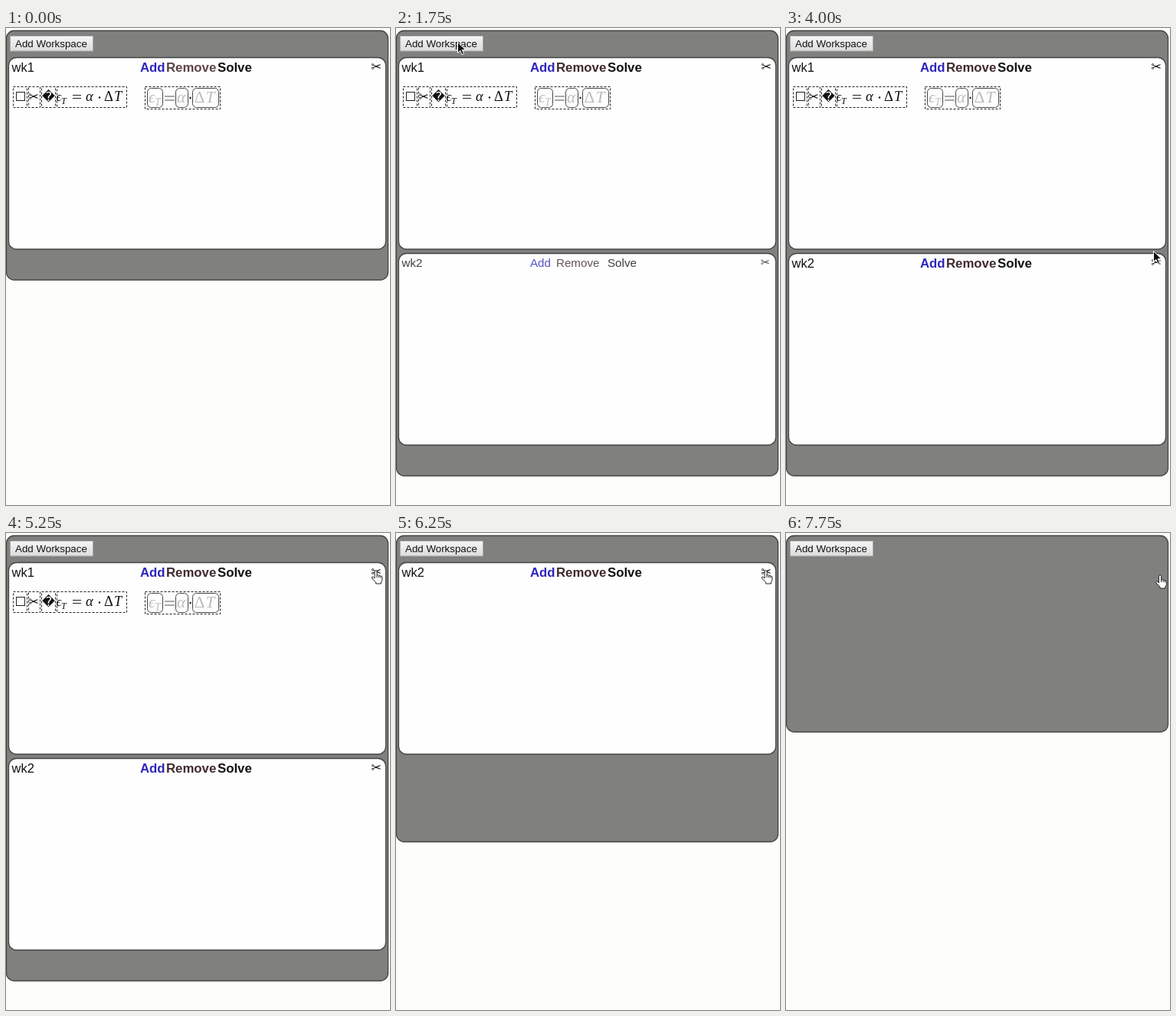
Recreate the animation shown at these times as an HTML page. Size 501 by 621 pixels, loop 8000 ms.

```html
<!DOCTYPE html>
<html lang="en">
<head>
<meta charset="utf-8">
<title>Workspaces</title>
<style>
  html, body { margin: 0; width: 100%; height: 100%; overflow: hidden; background: #fdfdfc; }
  svg { display: block; font-family: "Liberation Sans", sans-serif; }
  .sign { font-family: "DejaVu Sans", sans-serif; }
  .math { font-family: "Liberation Serif", "DejaVu Serif", serif; }
  .italic { font-style: italic; }
  .bold { font-weight: bold; }
  .dash { fill: none; stroke: #222; stroke-dasharray: 3 2; }
  .slot { fill: none; stroke: #444; }
</style>
</head>
<body>
<svg id="stage" width="501" height="621" viewBox="0 0 501 621"></svg>
<script>
const LOOP = 8000, STEP = 250, PITCH = 255;

// [time, value] pairs, each value held until the next time
const panelHeights = [[0, 325], [1500, 501], [1750, 580], [6250, 399], [6750, 325], [7750, 256]];

// [time, x, y] of the pointer's top left corner
const pointerPath = [
  [250, 476, 115], [500, 390, 88], [750, 250, 52], [1000, 125, 26], [1250, 80, 18],
  [2250, 80, 18], [2750, 340, 210], [3000, 428, 268], [3750, 480, 330],
  [4250, 478, 250], [5000, 475, 66], [5250, 476.5, 48],
  [6500, 476.5, 48], [7000, 482, 54], [LOOP, 482, 54]
];

const held = (keys, t) => keys.filter(k => k[0] <= t).pop()[1];

function along(path, t) {
  const i = path.findIndex(k => k[0] > t);
  const [t0, x0, y0] = path[i - 1], [t1, x1, y1] = path[i];
  const p = (t - t0) / (t1 - t0);
  return [x0 + (x1 - x0) * p, y0 + (y1 - y0) * p];
}

const text = (x, y, size, str, cls = "", fill = "#111") =>
  `<text x="${x}" y="${y}" font-size="${size}" class="${cls}" fill="${fill}">${str}</text>`;

const box = (x, y, w, h, cls, r = 0) =>
  `<rect x="${x + .5}" y="${y + .5}" width="${w}" height="${h}" rx="${r}" class="${cls}"/>`;

const equals = (x, y, w, gap, color) =>
  `<path d="M${x} ${y}h${w}m0 ${gap}h${-w}" stroke="${color}"/>`;

const dot = (x, y) => `<circle cx="${x}" cy="${y}" r="1.2" fill="#111"/>`;

function equation() {
  const grey = "#bcbcbc";
  return box(9, 76, 18, 27, "dash") + box(29, 76, 15, 27, "dash") +
    box(46, 76, 18, 27, "dash") + box(66, 76, 91, 27, "dash") +
    `<rect x="13.5" y="83.5" width="11" height="11" fill="none" stroke="#222"/>` +
    text(29.5, 95, 16, "✂", "sign") + text(47, 95, 16.5, "\uFFFD", "sign") +
    text(65.5, 95, 17, "ϵ", "math italic") + text(72, 98.5, 12, "T", "math italic") +
    equals(87, 87.5, 11, 4, "#222") + text(104, 95, 18.5, "α", "math italic") +
    dot(122, 90.5) + text(128, 95, 18.5, "Δ", "math") + text(141, 95, 18.5, "T", "math italic") +
    box(181, 76, 98, 29, "dash") + box(184, 78, 20, 25, "slot", 5) +
    box(221, 78, 16, 25, "slot", 5) + box(243, 78, 34, 25, "slot", 5) +
    text(186, 97, 21, "ϵ", "math italic", grey) + text(194, 101, 14, "T", "math italic", grey) +
    equals(207, 89, 13, 5, "#555") + text(223, 97, 21, "α", "math italic", grey) +
    dot(240.5, 91) + text(245.5, 97, 21.5, "Δ", "math", grey) +
    text(260.5, 97, 21.5, "T", "math italic", grey);
}

function workspace(name, top, t, grown = 1) {
  const done = grown === 1;
  const size = done ? 16.8 : 13 + 2.7 * grown, weight = done ? "bold" : "";
  const base = 55 + (done ? 2 : grown);
  const label = (x, str, color) => text(x, base, size, str, weight, color);
  return `<g transform="translate(0 ${top})">
    <rect x="3.5" y="38.5" width="492" height="249.5" rx="10" fill="#fefefe" stroke="#444" stroke-width="1.3"/>
    <g opacity="${grown}">${text(7.5, base, done ? 16.5 : size, name)}
    ${label(175, "Add", "#2e27bc")}
    ${label(209, "Remove", t < 1500 ? "#5c4444" : "#402a2e")}
    ${label(276, "Solve", "#111")}
    ${text(476, base - 1, done ? 16.5 : 14.5, "✂", "sign " + weight)}</g></g>`;
}

function button() {
  return `<rect x="5.5" y="10.5" width="108" height="19.5" fill="url(#face)" stroke="#aaa"/>` +
    text(12, 25, 13.33, "Add Workspace");
}

function pointer(t) {
  if (t < 250) return "";
  const [x, y] = along(pointerPath, t);
  const shape = t < 5250
    ? `<path d="M.5 .5V14.5L3.8 11.4L6.1 16.6L8.6 15.5L6.3 10.5H10.8Z" fill="#111" stroke="#fff"/>`
    : `<path d="M4.5 11V2.2Q4.5 .7 6 .7T7.5 2.2V7Q9 5.8 10 7.4Q11.5 6.5 12.3 8.2Q14 7.5 14.3 9.5V12.5
        Q14.3 14.5 12.8 16V18H6V16.3L1 11Q.2 9.4 1.6 9Q2.7 8.8 4.5 11ZM7.5 7V10M10 7.4V10M12.3 8.2V10.5"
        fill="#fff" stroke="#222"/>`;
  return `<g transform="translate(${x} ${y})">${shape}</g>`;
}

function scene(t) {
  const height = held(panelHeights, t);
  const panel = `x=".5" y="3.5" width="498" height="${height - .5}" rx="10"`;
  const grown = t < 1750 ? .4 : t < 2000 ? .8 : 1;
  let spaces = "";
  if (t < 6000) spaces += workspace("wk1", 0, t) + equation();
  if (t >= 1500 && t < 7750) spaces += workspace("wk2", t < 6000 ? PITCH : 0, t, grown);
  return `<defs>
    <linearGradient id="face" x2="0" y2="1"><stop stop-color="#f6f6f6"/><stop offset="1" stop-color="#dcdcdc"/></linearGradient>
    <clipPath id="inside"><rect ${panel}/></clipPath></defs>
    <rect ${panel} fill="#80807e"/>
    <g clip-path="url(#inside)">${button()}${spaces}</g>
    <rect ${panel} fill="none" stroke="#444" stroke-width="1.3"/>${pointer(t)}`;
}

const stage = document.getElementById("stage");
const start = performance.now();
let shown = -1;

function draw() {
  const elapsed = (performance.now() - start) % LOOP;
  const t = Math.floor(elapsed / STEP) * STEP;
  if (t !== shown) stage.innerHTML = scene(shown = t);
  requestAnimationFrame(draw);
}
draw();
</script>
</body>
</html>
```
